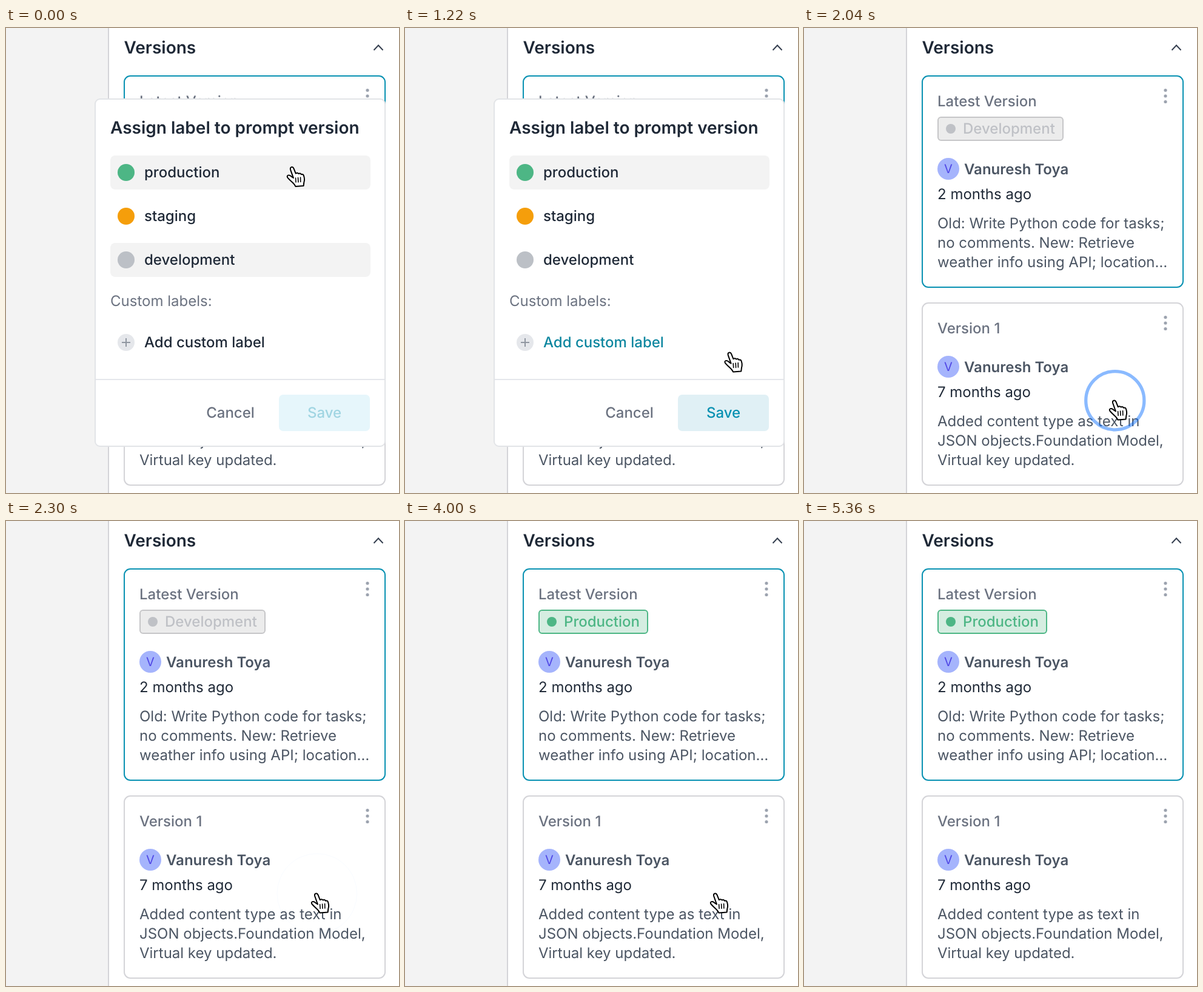
Animation, 648 px wide and 766 px high, one loop 5480 ms. Source, as an HTML page:

```html
<!DOCTYPE html>
<html lang="en">
<head>
<meta charset="utf-8">
<title>Assign label</title>
<style>
  html, body { margin: 0; width: 100%; height: 100%; overflow: hidden; background: #fff; }
  svg { display: block; }
  text {
    font: 400 24px Inter, "Open Sans", sans-serif;
    font-optical-sizing: none;
    text-rendering: geometricPrecision;
    fill: #4b5563;
  }
  .h { font-size: 28px; font-weight: 600; fill: #1f2937; }
  .m { font-weight: 500; }
  .b { font-weight: 600; }
  .dark { fill: #1f2937; }
  .soft { fill: #6b7280; }
  .mid { text-anchor: middle; }
  .v { font-size: 20px; fill: #4f46e5; text-anchor: middle; }
</style>
</head>
<body>
<svg width="648" height="766" viewBox="0 0 648 766">
  <defs>
    <g id="dots" fill="#9ca3af">
      <circle cy="-9.5" r="2.6"/><circle r="2.6"/><circle cy="9.5" r="2.6"/>
    </g>
    <g id="author">
      <circle cx="238" r="18" fill="#a5b4fc"/>
      <text class="v" x="238" y="7.3">V</text>
      <text class="b" x="264" y="8.5">Vanuresh Toya</text>
    </g>
  </defs>

  <rect width="169" height="766" fill="#f3f3f3"/>
  <rect x="168" width="2" height="766" fill="#d4d4d8"/>
  <text class="h" x="194.5" y="42">Versions</text>
  <path d="M606.5 36.5L614 28.5L621.5 36.5" fill="none" stroke="#374151" stroke-width="2"/>

  <rect x="195" y="79" width="430" height="348" rx="10" fill="#fff" stroke="#0891b2" stroke-width="2"/>
  <text class="m soft" x="220" y="129">Latest Version</text>
  <use href="#dots" x="596" y="112"/>
  <g id="badge">
    <rect x="221" y="147" height="38" rx="5" stroke-width="2"/>
    <circle cx="242" cy="166" r="8"/>
    <text class="m" x="262" y="174"></text>
  </g>
  <use href="#author" y="232"/>
  <text class="dark" x="220" y="282">2 months ago</text>
  <text x="220" y="330">Old: Write Python code for tasks;</text>
  <text x="220" y="362">no comments. New: Retrieve</text>
  <text x="220" y="394">weather info using API; location…</text>

  <rect x="195" y="453" width="430" height="300" rx="10" fill="#fff" stroke="#d4d4d8" stroke-width="2"/>
  <text class="m soft" x="220" y="503">Version 1</text>
  <use href="#dots" x="596" y="486"/>
  <use href="#author" y="558"/>
  <text class="dark" x="220" y="608">7 months ago</text>
  <text x="220" y="656">Added content type as text in</text>
  <text x="220" y="688">JSON objects.Foundation Model,</text>
  <text x="220" y="720">Virtual key updated.</text>

  <g id="modal">
    <rect x="147" y="117" width="478" height="572" rx="8" fill="#fff" stroke="#e2e4e7" stroke-width="2"/>
    <text class="h" x="172" y="174">Assign label to prompt version</text>
    <g id="rows"></g>
    <text class="soft" x="172" y="458">Custom labels:</text>
    <circle cx="198" cy="518" r="14" fill="#e5e7eb"/>
    <path d="M191 518H205M198 511V525" stroke="#9097a1" stroke-width="2"/>
    <text id="add" class="m" x="228" y="526">Add custom label</text>
    <rect x="148" y="578" width="476" height="2" fill="#e5e7eb"/>
    <text class="m soft mid" x="370" y="642">Cancel</text>
    <rect id="saveBox" x="450" y="604" width="150" height="60" rx="7"/>
    <text id="saveText" class="m mid" x="525" y="642">Save</text>
  </g>

  <circle id="ring" fill="none" stroke="#1677ff" stroke-opacity=".5"/>
  <g id="hand" stroke="#000" stroke-width="2" stroke-linejoin="round" stroke-linecap="round">
    <path fill="#fff" d="M12 20L7.2 6.5Q6.2 3 8.7 2.1Q11.3 1.4 12.5 4.3L15.8 12.6Q18.8 10.6 20.6 13Q23.4 11.6 25 14.2Q28 13.2 29 16.2Q31 22 29.4 27L28.6 33L15.6 34Q13.5 30 10 27Q6 23.5 2.5 19.5Q.8 16.6 3.2 15.6Q6 14.8 9 18Z"/>
    <path fill="none" stroke-width="1.6" d="M15.6 20L16.1 27M19.6 19.5L20 26.8M23.6 19L23.8 26.5"/>
  </g>
</svg>
<script>
const LOOP = 5480;
const $ = id => document.getElementById(id);
const set = (el, attrs) => { for (const k in attrs) el.setAttribute(k, attrs[k]); };
const lerp = (a, b, k) => a + (b - a) * k;
const span = (t, from, to) => Math.min(1, Math.max(0, (t - from) / (to - from)));
const mix = (a, b, k) => `rgb(${a.map((v, i) => lerp(v, b[i], k))})`;

const rows = [['production', '#4db685', 238], ['staging', '#f59e0b', 310], ['development', '#bcc0c6', 382]];
$('rows').innerHTML = rows.map(([name, color, y]) => `
  <rect x="172" y="${y - 28}" width="429" height="56" rx="8" fill="#f3f3f3"/>
  <circle cx="198" cy="${y}" r="14" fill="${color}"/>
  <text class="m dark" x="228" y="${y + 8}">${name}</text>`).join('');
const rowBoxes = $('rows').querySelectorAll('rect');
const [pill, dot, label] = $('badge').children;

function showBadge(name, width, main, back, edge) {
  set(pill, { width, fill: back, stroke: edge });
  dot.style.fill = label.style.fill = main;
  if (label.textContent !== name) label.textContent = name;
}

function handAt(t) {
  const settle = span(t, 0, 60);
  const p = span(t, 920, 1460);
  const e = 1 - (1 - p ** 1.3) ** 2.5;
  const out = span(t, 4000, 4260) ** 2;
  return [
    lerp(lerp(462, 457.5, settle), 502, e) + 200 * e * (1 - e) + 20 * out,
    lerp(lerp(227, 229.5, settle), 611.5, e) + 165 * out
  ];
}

// A disc grows while its hole opens until nothing is left.
function drawRing(t, x, y) {
  const start = t < 920 ? 400 : 1880;
  const p = span(t, start, start + 500);
  const e = 1 - (1 - p) ** 3;
  const outer = 17 + 49 * e, inner = 66 * e;
  set($('ring'), {
    cx: x + 10.8, cy: y + 2.2, r: (outer + inner) / 2, 'stroke-width': outer - inner,
    visibility: p > 0 && p < 1 ? 'visible' : 'hidden'
  });
}

function draw(t) {
  const [x, y] = handAt(t);
  set($('hand'), { transform: `translate(${x} ${y})` });
  drawRing(t, x, y);

  const picked = span(t, 460, 600);
  const chosen = [picked, 0, 1 - picked];
  rows.forEach(([, , cy], i) => {
    const hover = Math.abs(y + 2 - cy) < 28;
    set(rowBoxes[i], { opacity: hover ? 1 : chosen[i] });
  });
  $('add').style.fill = Math.abs(y + 2 - 518) < 28 ? '#0e87a0' : '#1f2937';
  $('saveBox').style.fill = mix([230, 246, 251], [224, 240, 245], picked);
  $('saveText').style.fill = mix([160, 213, 226], [8, 145, 178], picked);
  set($('modal'), { opacity: 1 - span(t, 1960, 2040) });

  if (t < 2600) showBadge('Development', 206, '#bfc1c6', '#ececec', '#c6c6c8');
  else showBadge('Production', 179, '#4db685', '#d5ede1', '#4db685');
}

const began = performance.now();
function tick() {
  draw((performance.now() - began) % LOOP);
  requestAnimationFrame(tick);
}
tick();
</script>
</body>
</html>
```
